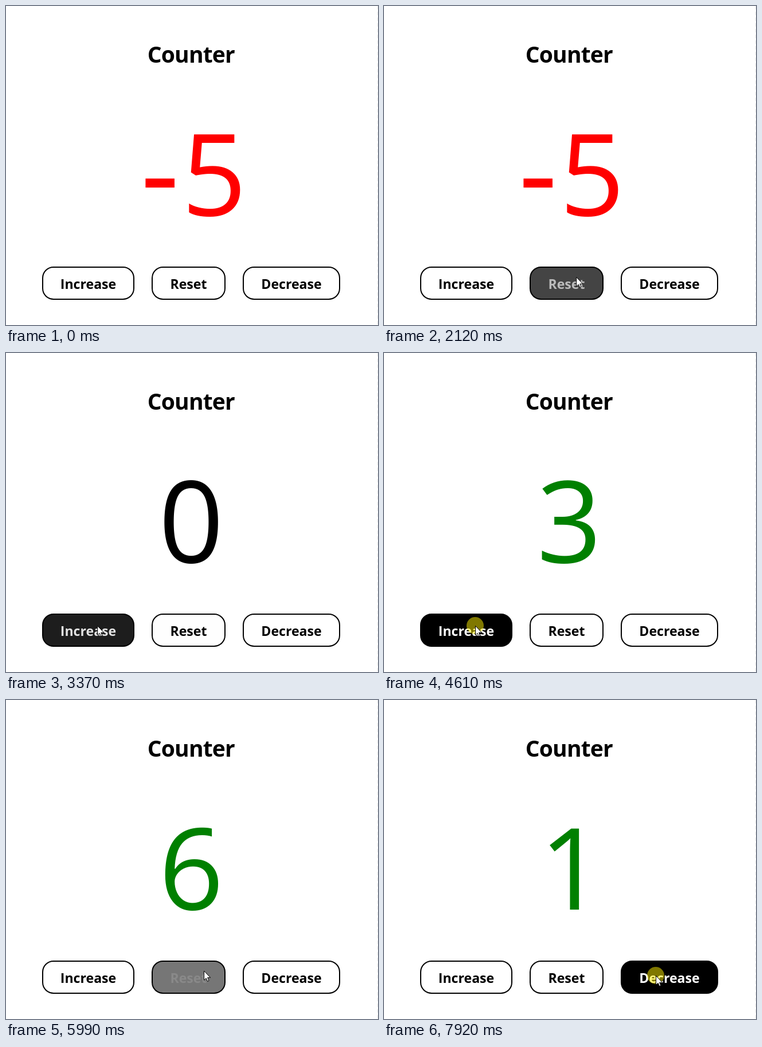
An HTML page for the animation above (8000 ms loop, 649 by 557 pixels).

```html
<!DOCTYPE html>
<html lang="en">
<head>
<meta charset="utf-8">
<title>Counter</title>
<style>
  html, body { margin: 0; width: 100%; height: 100%; overflow: hidden; background: #fff; }
  svg { display: block; font-family: "Open Sans", "Noto Sans", sans-serif; }
  .title { font-size: 39px; font-weight: 700; letter-spacing: -.85px; }
  .label { font-size: 23.1px; font-weight: 700; text-anchor: middle; }
  .value { font-size: 198px; text-anchor: middle; }
  .sign { font-family: Roboto, sans-serif; font-size: 212px; }
</style>
</head>
<body>
<svg width="649" height="557" viewBox="0 0 649 557">
  <rect width="649" height="557" fill="#fff"/>
  <path d="M648.5 0V557" stroke="#e8e8e8" stroke-dasharray="6 4"/>
  <text class="title" x="246.8" y="99">Counter</text>
  <text class="sign" id="sign" x="239.6" y="373" fill="red">-</text>
  <text class="value" id="value" y="366"></text>
  <g id="buttons"></g>
  <g id="pointer">
    <circle id="ring" r="15" fill="#fff000" fill-opacity=".5"/>
    <path d="M.5 .5V16.6L4.1 13.2L6.5 18.6L8.9 17.6L6.6 12.2H11.6Z"
          fill="#fff" stroke="#000" stroke-linejoin="round"/>
  </g>
</svg>
<script>
const LOOP = 8000, FADE = 300;
const $ = id => document.getElementById(id);

// hover: [enter, leave] pairs in ms
const buttons = [
  { text: 'Increase', x: 63, w: 161, hover: [[3190, 5700]] },
  { text: 'Reset', x: 254, w: 129, hover: [[1990, 3100], [5897, 6250]] },
  { text: 'Decrease', x: 413, w: 170, hover: [[1180, 1250], [6333, LOOP]] }
];

// evenly spaced clicks; a step of 0 resets the value
const bursts = [
  { start: 2590, every: 70, count: 1, step: 0 },
  { start: 4070, every: 178, count: 6, step: 1 },
  { start: 6740, every: 220, count: 2, step: -1 },
  { start: 7320, every: 200, count: 4, step: -1 }
];
const HOLD = 65;

// each move starts where the previous one ended; lift bends it upwards
const home = { x: 470, y: 560 };
const moves = [
  { from: 1130, to: 1520, x: 496, y: 374, lift: 0 },
  { from: 1690, to: 2160, x: 332, y: 475, lift: 0 },
  { from: 2960, to: 3380, x: 159, y: 476, lift: 0 },
  { from: 5470, to: 6160, x: 378, y: 478, lift: 25 },
  { from: 6180, to: 6560, x: 474, y: 481, lift: 0 }
];

const clamp = (v, lo, hi) => Math.min(hi, Math.max(lo, v));
const smooth = u => u * u * (3 - 2 * u);

function make(tag, attrs) {
  const el = document.createElementNS('http://www.w3.org/2000/svg', tag);
  for (const k in attrs) el.setAttribute(k, attrs[k]);
  return $('buttons').appendChild(el);
}

for (const b of buttons) {
  b.box = make('rect', {
    x: b.x + 1, y: 456, width: b.w - 2, height: 56, rx: 19,
    stroke: '#000', 'stroke-width': 2
  });
  b.label = make('text', { class: 'label', x: b.x + b.w / 2, y: 494 });
  b.label.textContent = b.text;
}

// cubic-bezier(.25, .1, .25, 1)
function ease(x) {
  if (x <= 0) return 0;
  if (x >= 1) return 1;
  let lo = 0, hi = 1, s = .5;
  for (let i = 0; i < 20; i++) {
    s = (lo + hi) / 2;
    if (.75 * s * (1 - s) + s ** 3 < x) lo = s; else hi = s;
  }
  return .3 * s * (1 - s) ** 2 + 3 * s * s * (1 - s) + s ** 3;
}

// a fade that turns back early takes proportionally less time
function hoverLevel(b, t) {
  return Math.max(...b.hover.map(([enter, leave]) => {
    const peak = ease((Math.min(t, leave) - enter) / FADE);
    return t < leave ? peak : peak * (1 - ease((t - leave) / (FADE * peak)));
  }));
}

function pointerAt(t) {
  let { x, y } = home;
  for (const m of moves) {
    if (t < m.from) break;
    const f = smooth(clamp((t - m.from) / (m.to - m.from), 0, 1));
    x += (m.x - x) * f;
    y += (m.y - y) * f - m.lift * Math.sin(Math.PI * f) ** 2;
  }
  return [x, y];
}

function valueAt(t) {
  return bursts.reduce((value, b) => {
    const done = clamp(Math.floor((t - b.start - HOLD) / b.every) + 1, 0, b.count);
    return done && !b.step ? 0 : value + done * b.step;
  }, -5);
}

const isDown = t => bursts.some(b => {
  const since = t - b.start;
  return since >= 0 && since < b.every * b.count && since % b.every < HOLD;
});

const gray = n => { const g = Math.round(255 * n); return `rgb(${g},${g},${g})`; };
const show = (id, on) => { $(id).style.display = on ? '' : 'none'; };

function draw(t) {
  const value = valueAt(t);
  $('value').textContent = Math.abs(value);
  $('value').setAttribute('x', value < 0 ? 363 : value === 1 ? 327.5 : 323);
  $('value').setAttribute('fill', value < 0 ? 'red' : value ? 'green' : '#000');
  show('sign', value < 0);

  for (const b of buttons) {
    const p = hoverLevel(b, t);
    b.box.setAttribute('fill', gray(1 - p));
    b.label.setAttribute('fill', gray(p));
  }

  const [x, y] = pointerAt(t);
  $('pointer').setAttribute('transform', `translate(${x.toFixed(2)} ${y.toFixed(2)})`);
  show('pointer', t >= 1160);
  show('ring', isDown(t));
}

const start = performance.now();
function tick() {
  draw((performance.now() - start) % LOOP);
  requestAnimationFrame(tick);
}
tick();
</script>
</body>
</html>
```
